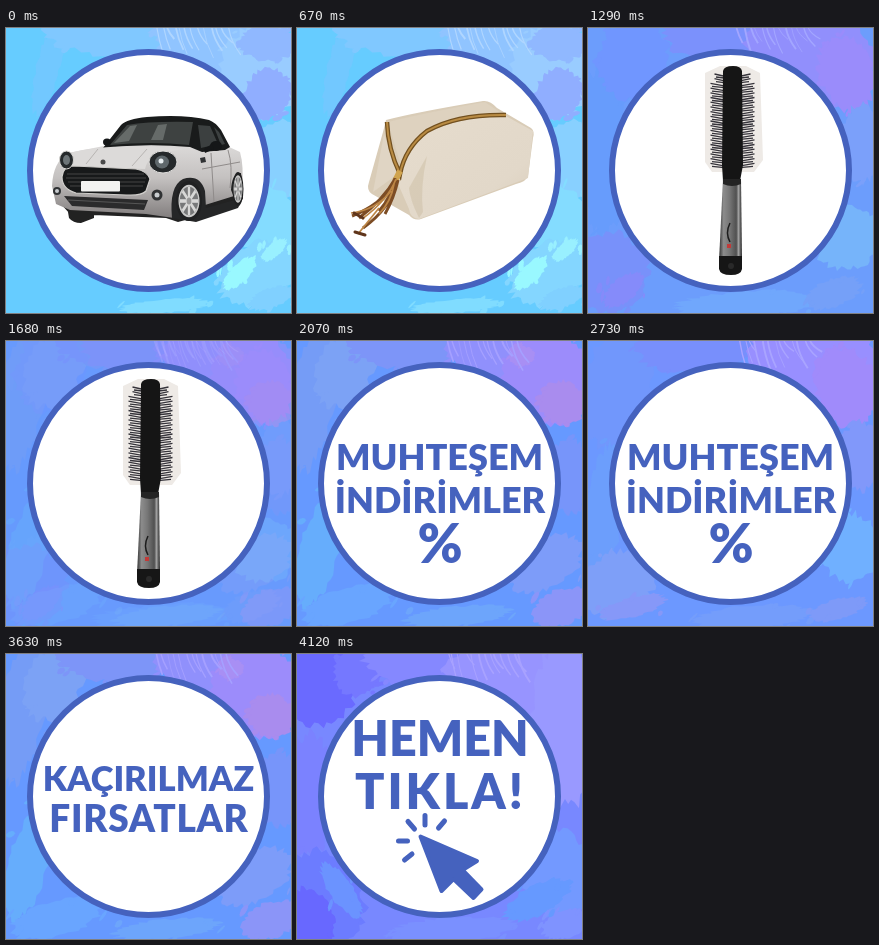
An HTML page that plays this animation: 285x285 px, repeating every 4.99 s.

```html
<!DOCTYPE html>
<html lang="tr">
<head>
<meta charset="utf-8">
<style>
html, body { margin: 0; width: 100%; height: 100%; overflow: hidden; }
svg { display: block; width: 100vw; height: 100vh; }
text { font-family: Lato, "Open Sans", sans-serif; font-weight: 900; fill: #4562be; text-anchor: middle; }
</style>
</head>
<body>
<svg viewBox="0 0 285 285">
  <defs>
    <linearGradient id="paint" x1="0" y1="0" x2="0" y2="1">
      <stop offset="0" stop-color="#dcdad9"/><stop offset=".45" stop-color="#c4c1c0"/><stop offset="1" stop-color="#827e7e"/>
    </linearGradient>
    <linearGradient id="steel">
      <stop offset="0" stop-color="#333"/><stop offset=".2" stop-color="#8c8c8c"/><stop offset=".45" stop-color="#777"/>
      <stop offset=".75" stop-color="#505050"/><stop offset=".85" stop-color="#a0a0a0"/><stop offset="1" stop-color="#222"/>
    </linearGradient>
    <linearGradient id="cloth" x1="0" y1="0" x2="1" y2="1">
      <stop offset="0" stop-color="#e6dccd"/><stop offset=".7" stop-color="#e2d8c9"/><stop offset="1" stop-color="#d8ccb9"/>
    </linearGradient>
  </defs>
  <g id="sky"></g>
  <circle cx="142.5" cy="142.5" r="118.5" fill="#fff" stroke="#4562be" stroke-width="6"/>

  <g class="scene">
    <path d="M61 178L63 190Q67 195 75 195L88 190V178ZM54 175L64 186 160 190 172 194 232 178 237 170 230 155Z" fill="#222"/>
    <path d="M46 158Q47 134 62 125L98 118 182 117 221 118 234 124Q238 138 236 160L228 168 199 177 194 160 171 160 168 190 140 186 64 182 50 176Z" fill="url(#paint)"/>
    <path d="M97 120L115 97Q121 91 141 89 178 86 203 92 209 94 215 102L224 119 219 122 196 124 184 119Q140 115 97 120Z" fill="#191b1b"/>
    <path d="M104 117L121 97Q145 93 187 94L183 117Q145 113 104 117Z" fill="#3e4241"/>
    <path d="M108 115L124 98 131 97 123 113ZM145 112L152 97 161 96 157 112Z" fill="#666b69"/>
    <path d="M192 97L204 98 212 116 195 120ZM208 99L213 104 219 116 215 117Z" fill="#3c4040"/>
    <path d="M63 125Q105 114 177 121L150 126Q141 132 139 141L66 139Q69 131 63 125Z" fill="#dcdad9"/>
    <path d="M80 136L92 121M126 138L141 121" stroke="#b7b4b2" fill="none"/>
    <path d="M56 149Q57 138 68 138L130 141Q141 143 144 151L140 163Q135 168 120 167L70 165Q56 161 56 149Z" fill="#17191a" stroke="#d1cfcc" stroke-width="1.2"/>
    <path d="M61 146H138M60 150H140M62 154H139M64 158H137" stroke="#444"/>
    <rect x="75" y="153" width="39" height="10.500" rx="1" fill="#f3f3f1"/>
    <path d="M58 168L142 172 138 182 66 178Z" fill="#2b2b2c"/>
    <path d="M62 172L139 176" stroke="#565656"/>
    <ellipse cx="60.500" cy="132" rx="7" ry="9" fill="#25292b" stroke="#d6d5d2"/>
    <ellipse cx="60.500" cy="132" rx="3.500" ry="5" fill="#6d7578"/>
    <ellipse cx="157" cy="134" rx="14" ry="11" fill="#25292b" stroke="#dfdedc"/>
    <ellipse cx="156" cy="134" rx="7" ry="6.500" fill="#5f686c"/>
    <circle cx="155" cy="133" r="2.500" fill="#e7edf0"/>
    <circle cx="51" cy="163" r="4" fill="#303234"/><circle cx="51" cy="163" r="2" fill="#c8cccf"/>
    <circle cx="151" cy="167" r="5.500" fill="#303234"/><circle cx="151" cy="167" r="2.500" fill="#c8cccf"/>
    <circle cx="97" cy="134" r="2.500" fill="#4a4a4a"/>
    <path d="M166 190Q163 158 177 151 194 146 199 163L200 180 229 172 225 162Q226 144 235 145L237 170 232 180 190 194Z" fill="#252627"/>
    <path d="M205 125L208 174M222 122Q227 138 224 160M196 141L234 134" stroke="#8f8b8a" fill="none"/>
    <path d="M194 130L199 129 200 134 195 135Z" fill="#303234"/>
    <g id="wheels"></g>
    <ellipse cx="210" cy="118" rx="6" ry="5" fill="#151718"/><path d="M198 121L206 116 208 121 199 125Z" fill="#151718"/>
    <ellipse cx="101" cy="114" rx="4" ry="3.500" fill="#151718"/>
  </g>

  <g class="scene">
    <path d="M89 92Q120 84 186 73 193 72 200 80L234 100Q238 103 236 110L231 148Q230 153 219 156L124 191Q117 193 112 187L75 166Q69 162 72 154L86 104Z" fill="#d9ccb7"/>
    <path d="M91 94L104 138Q109 118 127 104 149 92 204 85L188 74Q127 85 91 94Z" fill="#ded2bf"/>
    <path d="M103 147Q111 121 132 104 164 89 207 87L236 103 231 150 122 191Q113 190 112 181L102 158Z" fill="url(#cloth)"/>
    <path d="M122 190Q113 172 112 160L130 128Q123 160 126 184Z" fill="#d3c6b0" opacity=".7"/>
    <path d="M87 106L101 146 76 164Z" fill="#e0d5c4"/>
    <g fill="none">
      <path id="zip" d="M90 94Q91 121 103 146 108 120 130 103 160 86 209 87" stroke="#72501f" stroke-width="4.500"/>
      <path d="M90 94Q91 121 103 146 108 120 130 103 160 86 209 87" stroke="#b98b43" stroke-width="2"/>
      <path d="M103 143L98 153" stroke="#d0a44e" stroke-width="6"/>
      <path d="M98 150Q94 170 82 183M98 151Q87 171 62 190M100 153Q94 180 66 200M97 155Q85 176 55 188M101 152Q97 170 88 186" stroke="#7c4c24" stroke-width="3"/>
      <path d="M99 151Q91 172 65 191M97 156Q94 174 82 186M94 163Q79 182 54 185M82 180L61 206" stroke="#bd8646" stroke-width="1.700"/>
      <path d="M57 185L66 190M58 204L68 207" stroke="#5f351b" stroke-width="3" stroke-linecap="round"/>
    </g>
  </g>

  <g class="scene">
    <path d="M117 45L132 38 158 38 172 45 175 132 166 144 124 144 117 134Z" fill="#eeeae6"/>
    <g id="bristles"></g>
    <path d="M135 43Q136 38 145 38 153 38 154 43L155 137 152 153H135L134 137Z" fill="#151515"/>
    <path d="M135 151H153L154 233H131Z" fill="url(#steel)"/>
    <path d="M135 151H153V156Q144 160 135 156Z" fill="#242424"/>
    <path d="M131 228H154V241Q153 247 143 247 132 247 131 241Z" fill="#161616"/>
    <path d="M142 195Q137 205 142 214" fill="none" stroke="#1c1c1c" stroke-width="1.500"/>
    <rect x="139" y="216" width="4" height="4" fill="#c23a38"/>
    <circle cx="143" cy="238" r="3" fill="#292929"/>
  </g>

  <g class="scene">
    <text x="142.500" y="129" font-size="36">MUHTEŞEM</text>
    <text x="143" y="171.500" font-size="36">İNDİRİMLER</text>
    <text x="143" y="222" font-size="54">%</text>
  </g>
  <g class="scene">
    <text x="142.500" y="137" font-size="34.500">KAÇIRILMAZ</text>
    <text x="143" y="177.500" font-size="37" letter-spacing=".7">FIRSATLAR</text>
  </g>
  <g class="scene">
    <text x="143" y="101.500" font-size="48.500">HEMEN</text>
    <text x="143.500" y="154.500" font-size="48.500" letter-spacing="3">TIKLA!</text>
    <g id="click" fill="#4562be" stroke="#4562be" stroke-linejoin="round" stroke-linecap="round">
      <path d="M123.500 182.500L180 207 165.500 216 184.500 235.500 176.500 244 156.500 225 144.500 237Z" stroke-width="4"/>
      <path d="M128 161.500V171M147.500 167L141.500 174M111 167.500L117.500 175M101.500 187H110.500M107.500 206L115 200" fill="none" stroke-width="5"/>
    </g>
  </g>
</svg>
<script>
const NS = "http://www.w3.org/2000/svg";
const $ = id => document.getElementById(id);

function add(parent, tag, attrs) {
  const el = document.createElementNS(NS, tag);
  for (const k in attrs) el.setAttribute(k, attrs[k]);
  return parent.appendChild(el);
}

let seed = 11;
function rand() {
  seed = (seed * 16807) % 2147483647;
  return seed / 2147483647;
}

// Ragged dab of paint
function dab(parent, x, y, rx, ry, tilt, fill) {
  const pts = [];
  for (let i = 0; i < 64; i++) {
    const a = i / 64 * Math.PI * 2, r = 0.86 + rand() * 0.22;
    pts.push((Math.cos(a) * rx * r).toFixed(1) + "," + (Math.sin(a) * ry * r).toFixed(1));
  }
  add(parent, "polygon", { points: pts.join(" "), fill, transform: `translate(${x} ${y}) rotate(${tilt})` });
}

// Fine bristle marks along the top edge
function hairs(parent, stroke) {
  for (let i = 0; i < 13; i++) {
    const x = 148 + i * 6 + rand() * 4, len = 10 + rand() * 20;
    add(parent, "path", { d: `M${x} 0q2 ${len / 2} ${6 + i / 2} ${len}`, fill: "none", stroke, "stroke-width": 0.6 + rand() * 1.4 });
  }
}

// Base, bristle mark colour, then dabs: x, y, rx, ry, tilt, colour
const paints = [
  ["#66ccff", "#b0d6ff", [
    [42, 40, 12, 50, 14, "#72c8ff"], [110, 2, 75, 26, 0, "#80c8ff"], [205, 12, 60, 36, 10, "#90c4ff"],
    [256, 42, 44, 48, 20, "#99ccff"], [262, 15, 30, 18, 0, "#90b8ff"], [262, 66, 24, 26, 25, "#90aeff"],
    [274, 130, 28, 40, 0, "#88d0ff"], [264, 195, 34, 40, -30, "#84dcff"], [252, 245, 44, 30, -30, "#84d6ff"],
    [234, 245, 22, 9, -45, "#99f8ff"], [268, 222, 16, 7, -40, "#99f0ff"], [265, 270, 24, 10, -20, "#80d0ff"],
    [160, 278, 46, 7, -4, "#80dcff"]]],
  ["#6c9dfc", "#a3a6ff", [
    [15, 120, 24, 90, 0, "#679cfc"], [45, 30, 36, 42, 15, "#7096ff"], [130, 5, 55, 30, 0, "#7b91fc"],
    [225, 30, 70, 50, 8, "#918ffc"], [258, 45, 28, 40, -18, "#9a8cfb"], [275, 115, 24, 40, 0, "#7ba0fa"],
    [20, 245, 42, 42, -20, "#7891fa"], [35, 262, 24, 12, -40, "#858bfa"], [260, 210, 36, 32, -30, "#76b4fa"],
    [160, 276, 75, 13, -3, "#70a7fc"], [245, 265, 30, 14, -20, "#75a0f8"]]],
  ["#6699ff", "#a5a0ff", [
    [17, 55, 24, 80, 12, "#759cf6"], [48, 28, 28, 42, 25, "#7ca2f5"], [105, 3, 60, 25, 5, "#7d95f8"],
    [202, 10, 54, 38, 10, "#9090fc"], [250, 38, 47, 48, -10, "#9c8cfb"], [266, 62, 25, 22, 20, "#a98cee"],
    [225, 15, 13, 10, 0, "#a88ff4"], [272, 135, 24, 38, 0, "#7795fa"], [22, 210, 20, 62, 16, "#66adfc"],
    [50, 265, 48, 18, -15, "#69a5ff"], [248, 223, 42, 25, -30, "#7d9cf9"], [265, 266, 32, 18, -20, "#8b95f8"],
    [160, 275, 55, 10, -5, "#6da5fb"]]],
  ["#6c98ff", "#a9a4ff", [
    [30, 45, 35, 66, 12, "#7197fc"], [105, 5, 62, 28, 0, "#788ffc"], [226, 24, 75, 49, 8, "#988fff"],
    [258, 46, 32, 42, -20, "#a08bfb"], [274, 115, 25, 35, 0, "#8198fa"], [16, 170, 20, 70, 8, "#6c9efc"],
    [30, 243, 40, 32, -30, "#7e9ff8"], [45, 266, 35, 10, -15, "#8698f8"], [261, 206, 32, 37, -25, "#70b0ff"],
    [165, 276, 60, 12, -4, "#749dfb"], [250, 268, 30, 10, -15, "#7e9af8"]]],
  ["#7888ff", "#a8a2ff", [
    [15, 30, 46, 44, 20, "#6a6aff"], [62, 14, 24, 30, 25, "#7578ff"], [125, 4, 60, 30, 0, "#8588ff"],
    [225, 30, 78, 60, 10, "#9794ff"], [268, 70, 34, 85, 0, "#9999ff"], [13, 140, 26, 62, 0, "#7b82ff"],
    [23, 247, 45, 52, -18, "#6c7cff"], [12, 265, 24, 34, -30, "#6868ff"], [44, 236, 12, 32, -35, "#6b93ff"],
    [262, 220, 38, 48, -28, "#7399ff"], [240, 246, 38, 15, -28, "#6699ff"], [155, 276, 65, 13, -4, "#7a90ff"],
    [268, 270, 25, 14, -18, "#7f93ff"]]]
];

const layers = paints.map(([base, fine, dabs]) => {
  const g = add($("sky"), "g", {});
  add(g, "rect", { width: 285, height: 285, fill: base });
  for (const d of dabs) {
    dab(g, ...d);
    // Dry-brush flecks around the edge of the dab
    for (let i = 0; i < 5; i++) {
      const a = rand() * 6.3;
      dab(g, d[0] + Math.cos(a) * d[2], d[1] + Math.sin(a) * d[3], 2 + rand() * 5, 1 + rand() * 2, d[4] - 40, d[5]);
    }
  }
  hairs(g, fine);
  return g;
});

function wheel(x, y, rx, ry) {
  const g = add($("wheels"), "g", { transform: `translate(${x} ${y}) scale(${rx / 10} ${ry / 10})` });
  add(g, "circle", { r: 10, fill: "#202122" });
  add(g, "circle", { r: 7.6, fill: "#777879", stroke: "#c9c9c8", "stroke-width": 1 });
  for (let a = 0; a < 360; a += 45)
    add(g, "path", { d: "M0 0V-7", stroke: "#d8d8d7", "stroke-width": 1.8, transform: `rotate(${a})` });
  add(g, "circle", { r: 1.8, fill: "#999" });
}
wheel(183, 173, 13, 20);
wheel(232, 161, 5.5, 17);

for (let y = 47; y < 140; y += 4.7) {
  const w = y < 52 ? 18 : 22;
  add($("bristles"), "path", {
    d: `M${144.5 - w} ${y - 1}L144 ${y + 3} ${144.5 + w} ${y - 1}M${146 - w} ${y + 2}L144 ${y + 4} ${143 + w} ${y + 2}`,
    fill: "none", stroke: "#36343b", "stroke-width": 1.3
  });
}

const LOOP = 4990, STEP = 30, MOVE = 870, REST = 4050;
const cuts = [0, 670, 1260, 1920, 2790, 3660];
const fades = [[840, 0], [1290, 1], [2070, 2], [2730, 3], [3630, 2], [4050, 4]];
const scenes = [...document.querySelectorAll(".scene")];
const show = (el, on) => { el.style.display = on ? "" : "none"; };

function paintSky(t) {
  const q = t < MOVE ? 840 : Math.min(REST, MOVE + Math.floor((t - MOVE) / STEP) * STEP);
  let i = 0;
  while (i < fades.length - 2 && q >= fades[i + 1][0]) i++;
  const [t0, a] = fades[i], [t1, b] = fades[i + 1];
  const u = (q - t0) / (t1 - t0), low = Math.min(a, b), high = Math.max(a, b);
  layers.forEach((g, n) => {
    show(g, n === low || n === high);
    g.setAttribute("opacity", n === low ? 1 : b > a ? u : 1 - u);
  });
}

function draw(t) {
  paintSky(t);
  const now = cuts.filter(c => t >= c).length - 1;
  scenes.forEach((s, n) => show(s, n === now));
  show($("click"), t >= 4120);
}

const start = performance.now();
function tick() {
  draw((performance.now() - start) % LOOP);
  requestAnimationFrame(tick);
}
draw(0);
requestAnimationFrame(tick);
</script>
</body>
</html>
```
